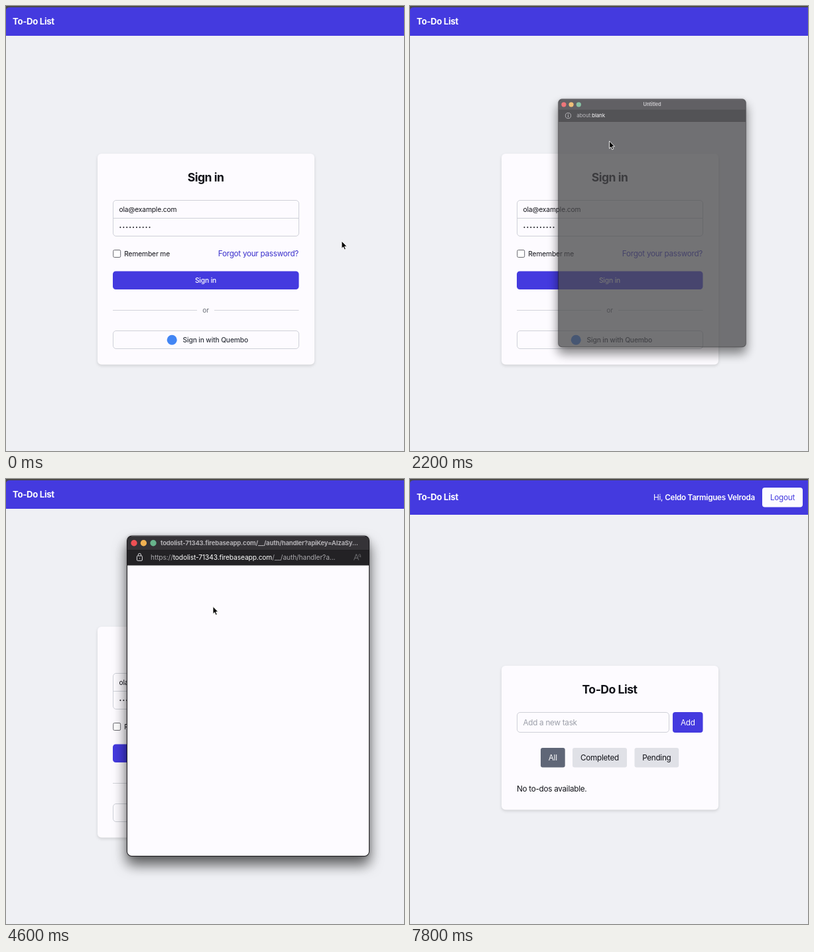
An HTML page for the animation above (8000 ms loop, 600x672 px).

```html
<!DOCTYPE html>
<html lang="en">
<head>
<meta charset="utf-8">
<title>To-Do List</title>
<style>
  html, body { margin: 0; height: 100%; overflow: hidden; background: #eff0f4; }
  svg { display: block; width: 100%; height: 100%; }
  text { font: 11.68px Inter, Roboto, sans-serif; letter-spacing: -.022em; fill: #111218; white-space: pre; }
  .sm { font-size: 10.22px; letter-spacing: -.012em; }
  .lg { font-size: 13.14px; }
  .xl { font-size: 17.52px; letter-spacing: -.027em; }
  .title { font-size: 9.49px; letter-spacing: -.02em; }
  .medium { font-weight: 500; }
  .semi { font-weight: 600; }
  .bold { font-weight: 700; }
  .card { fill: #fdfbff; filter: drop-shadow(0 2px 2px rgba(0, 0, 0, .13)); }
  .field { fill: #fdfbff; stroke: #cfd1d8; }
  .indigo { fill: #443adf; }
  .popup { filter: drop-shadow(0 12px 10px rgba(0, 0, 0, .56)) drop-shadow(0 0 2px rgba(0, 0, 0, .25)); }
  .popup.idle { filter: drop-shadow(0 7px 8px rgba(0, 0, 0, .38)) drop-shadow(0 0 2px rgba(0, 0, 0, .2)); }
  .bar { fill: #353337; }
  .idle .bar { fill: #242527; }
  .idle .light { fill: #454648; }
  .caption { fill: #b1afb3; }
  .idle .caption { fill: #6b6b6e; }
</style>
</head>
<body>
<svg viewBox="0 0 600 672">
  <rect width="600" height="672" fill="#eff0f4"/>
  <rect width="600" height="8" fill="#4a484d"/>
  <path id="header" class="indigo"/>
  <text id="brand" class="lg bold" x="10" fill="#fff" style="fill:#fff">To-Do List</text>

  <g id="login">
    <rect class="card" x="138" y="223" width="327" height="318.5" rx="6"/>
    <text class="xl bold" x="301" y="264.5" text-anchor="middle">Sign in</text>
    <rect class="field" x="161.5" y="293.5" width="280" height="54" rx="4.5"/>
    <path d="M161.5 320.5h280" stroke="#cfd1d8"/>
    <text class="sm" x="170.5" y="311">ola@example.com</text>
    <path d="M172.4 334.2h44.2" stroke="#111218" stroke-width="2" stroke-linecap="round" stroke-dasharray="0 4.9"/>
    <rect x="161.7" y="368.5" width="11" height="11" rx="1.8" fill="#fff" stroke="#68686e"/>
    <text class="sm" x="178.3" y="377.7">Remember me</text>
    <text x="441" y="378.3" text-anchor="end" style="fill:#3a30cc">Forgot your password?</text>
    <rect class="indigo" x="161" y="400.5" width="280.5" height="27.5" rx="4.5"/>
    <text class="sm medium" x="301" y="418" text-anchor="middle" style="fill:#fff">Sign in</text>
    <path d="M161 459.5h127M314 459.5h127.5" stroke="#d3d4da"/>
    <text class="sm" x="301" y="463.2" text-anchor="middle" style="fill:#6c7079">or</text>
    <rect id="provider" class="field" x="161.5" y="490.5" width="280" height="27" rx="4.5"/>
    <circle cx="250.2" cy="504.2" r="7.5" fill="#4285f4"/>
    <text class="sm medium" x="266.5" y="507.8" style="fill:#30343d">Sign in with Quembo</text>
  </g>

  <g id="todo">
    <text x="520" y="32" text-anchor="end" style="fill:#fff">Hi, <tspan class="semi">Celdo Tarmigues Velroda</tspan></text>
    <rect x="531" y="13" width="61" height="29.5" rx="4" fill="#fdfbff"/>
    <text x="561.5" y="32" text-anchor="middle" style="fill:#443adf">Logout</text>
    <rect class="card" x="138" y="282" width="327" height="217.5" rx="6"/>
    <text class="xl bold" x="301" y="323.5" text-anchor="middle">To-Do List</text>
    <rect class="field" x="161.5" y="352.5" width="229" height="30" rx="4.5"/>
    <text x="170.5" y="372" style="fill:#9b9ea8">Add a new task</text>
    <rect class="indigo" x="396" y="352" width="45.5" height="31" rx="4"/>
    <text x="418.8" y="372" text-anchor="middle" style="fill:#fff">Add</text>
    <rect x="197" y="406" width="36.7" height="29.5" rx="3" fill="#5f6677"/>
    <rect x="245" y="406" width="82" height="29.5" rx="3" fill="#e0e1e7"/>
    <rect x="338.5" y="406" width="66.7" height="29.5" rx="3" fill="#e0e1e7"/>
    <text x="215.3" y="425" text-anchor="middle" style="fill:#fff">All</text>
    <text x="286" y="425" text-anchor="middle">Completed</text>
    <text x="371.8" y="425" text-anchor="middle">Pending</text>
    <text x="161" y="472">No to-dos available.</text>
  </g>

  <g id="popup" class="popup">
    <rect x="182" y="85.5" width="366" height="484.5" rx="7.5" fill="#1b1a1d"/>
    <path class="bar" d="M183 107V93a6.5 6.5 0 0 1 6.5-6.5h351a6.5 6.5 0 0 1 6.5 6.5v14z"/>
    <path d="M189 86.4h352" stroke="#67656a" stroke-width=".7"/>
    <path d="M183 107.5h364v22.5h-364z" fill="#232225"/>
    <path id="page" d="M183 130.5h364v432a6.5 6.5 0 0 1-6.5 6.5h-351a6.5 6.5 0 0 1-6.5-6.5z"/>
    <circle class="light" cx="193" cy="96.7" r="4.7" fill="#ee5054"/>
    <circle class="light" cx="207.4" cy="96.7" r="4.7" fill="#f0b152"/>
    <circle class="light" cx="222" cy="96.7" r="4.7" fill="#68b48c"/>
    <text id="caption" class="title bold caption" y="100"></text>
    <text class="sm" x="218" y="122" style="fill:#a9a8ac"><tspan id="scheme"></tspan><tspan id="host" fill="#fff"></tspan><tspan id="path"></tspan></text>
    <g id="info" fill="none" stroke="#c4c3c6">
      <circle cx="201.5" cy="118.3" r="5.3"/>
      <path d="M201.5 117.3v4M201.5 114.9v1.2" stroke-width="1.2"/>
    </g>
    <g id="secure" fill="none" stroke="#dddce0">
      <rect x="197.4" y="116" width="8" height="7.3" rx="1.3"/>
      <path d="M199.3 116v-1.5a2.1 2.1 0 0 1 4.2 0v1.5M201.4 119v1.4"/>
      <path d="M524.5 122.5l3.6-9 3.6 9M525.8 119.4h4.6M531 114.3q1.6 1.4 1.2 3.4M532.8 113q2.4 2.2 1.8 5.2" stroke="#77767a" stroke-width=".9"/>
    </g>
    <g id="progress">
      <rect x="183" y="130.5" width="364" height="3.8" fill="#c3bdee"/>
      <rect id="runner" y="130.5" height="3.8" fill="#4239b2"/>
      <rect id="chaser" y="130.5" height="3.8" fill="#4239b2"/>
    </g>
  </g>

  <g id="cursor">
    <path id="arrow" d="M0 0v11.2l2.5-2.3 1.8 4.1 2-.9-1.8-3.9h3.5z" fill="#000" stroke="#fff" stroke-width=".9"/>
    <path id="hand" d="M-1.8 7.2V1.2Q-1.8 0-.8 0T.3 1.2v3.4q1.2-.9 2 .3 1.3-.6 1.8.6 1.5-.2 1.5 1.3 0 3-1.6 4.7v1.2h-5.4v-1.1q-2.2-2-3.6-4.8.9-1.5 3.2.4z" fill="#fff" stroke="#111" stroke-width="1" stroke-linejoin="round"/>
  </g>
</svg>
<script>
const LOOP = 8000, STEP = 200;
const OPEN = 2200, CLOSE = 6000, IDLE = 5800, SIGNED_IN = 6400;
const HOST = 'todolist-71343.firebaseapp.com';

// [time, x, y] of the pointer's tip
const POINTER = [
  [0, 506, 355], [200, 497, 366], [400, 440, 428], [600, 350, 502], [800, 325, 513],
  [1400, 325, 513], [1600, 319, 440], [1800, 307, 285], [2000, 300.5, 204],
  [3800, 300.5, 203.5], [4200, 312, 192.5], [8000, 312, 192.5]
];
// Each load: start of its progress bar, its end, and the address query
const LOADS = [
  { start: 2660, end: 4000, title: 'apiKey=AIzaSy...', query: 'a...' },
  { start: 4736, end: CLOSE, title: 'state=AMbdm...', query: 'st...' }
];

const ui = {};
document.querySelectorAll('[id]').forEach(el => ui[el.id] = el);

const show = (el, on) => el.style.display = on ? '' : 'none';
const set = (el, attrs) => Object.entries(attrs).forEach(([k, v]) => el.setAttribute(k, v));

// Piecewise linear lookup in rows of [key, ...values]
function sample(rows, key) {
  const i = Math.max(1, rows.findIndex(r => r[0] >= key));
  const a = rows[i - 1], b = rows[i];
  const k = (key - a[0]) / (b[0] - a[0]);
  return a.slice(1).map((v, n) => v + (b[n + 1] - v) * k);
}

function drawHeader(signedIn) {
  const bottom = signedIn ? 54 : 45;
  set(ui.header, { d: `M0 ${bottom}V7Q0 2 6 2H600V${bottom}Z` });
  set(ui.brand, { y: signedIn ? 32 : 27.7 });
}

function placeBar(el, [left, width]) {
  set(el, { x: 183 + 364 * left, width: 364 * width });
}

function drawPopup(t) {
  show(ui.popup, t >= OPEN && t < CLOSE);
  const opening = t < OPEN + STEP;
  set(ui.popup, {
    class: t >= IDLE ? 'popup idle' : 'popup',
    opacity: opening ? .76 : 1,
    transform: opening ? 'translate(365 327.5) scale(.774) translate(-365 -327.5)' : ''
  });

  const load = LOADS.filter(l => t >= l.start).pop();
  show(ui.info, !load);
  show(ui.secure, load);
  set(ui.page, { fill: load ? '#fdfbff' : '#49494b' });
  set(ui.caption, { x: load ? 233 : 365, 'text-anchor': load ? 'start' : 'middle' });
  const route = '/__/auth/handler?';
  ui.caption.textContent = load ? HOST + route + load.title : 'Untitled';
  ui.scheme.textContent = load ? 'https://' : 'about:';
  ui.host.textContent = load ? HOST : 'blank';
  ui.path.textContent = load ? route + load.query : '';

  const busy = load && t < load.end;
  show(ui.progress, busy);
  if (busy) {
    const phase = (t - load.start) / 2000 % 1;
    placeBar(ui.runner, sample([[0, 0, 0], [.5, .25, .75], [.75, 1, 0], [1, 1, 0]], phase));
    placeBar(ui.chaser, sample([[0, 0, 0], [.54, 0, 0], [.75, 0, .25], [1, 1, 0]], phase));
  }
}

function drawPointer(t) {
  const [x, y] = sample(POINTER, t);
  const hover = t < OPEN && x > 161 && x < 442 && y > 490 && y < 518;
  show(ui.cursor, t < IDLE);
  show(ui.hand, hover);
  show(ui.arrow, !hover);
  set(ui.cursor, { transform: `translate(${x} ${y})` });
  ui.provider.style.fill = hover ? '#f6f4f7' : '';
}

function render(now) {
  const t = Math.floor(now % LOOP / STEP) * STEP;
  const signedIn = t >= SIGNED_IN;
  drawHeader(signedIn);
  show(ui.login, !signedIn);
  show(ui.todo, signedIn);
  drawPopup(t);
  drawPointer(t);
}

const began = performance.now();
function tick() {
  render(performance.now() - began);
  requestAnimationFrame(tick);
}
tick();
</script>
</body>
</html>
```
